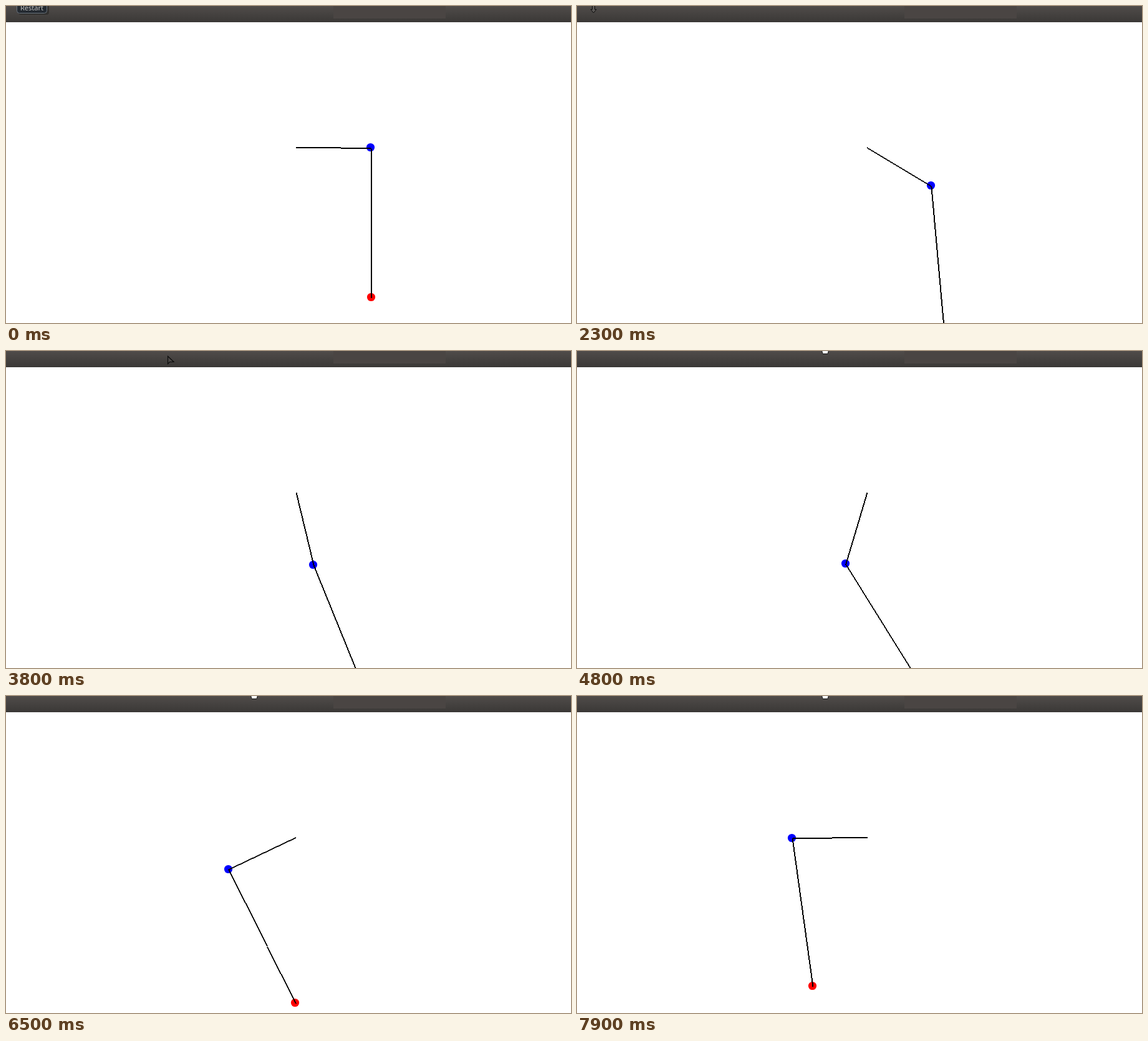
Animation, 906 px wide and 508 px high, one loop 8 s. Source, as an HTML page with a canvas:

```html
<!DOCTYPE html>
<html lang="en">
<head>
<meta charset="utf-8">
<title>Double pendulum</title>
<style>
  html, body { margin: 0; width: 906px; height: 508px; overflow: hidden; background: #fff; }
  canvas, svg { position: absolute; left: 0; top: 0; display: block; }
  text { font: 11px "Noto Sans", "Open Sans", sans-serif; fill: #c3c2c0; }
</style>
</head>
<body>
<canvas id="stage" width="906" height="508"></canvas>
<svg width="906" height="26" viewBox="0 0 906 26">
  <linearGradient id="bar" x1="0" y1="0" x2="0" y2="1">
    <stop offset="0" stop-color="#504c4a"/>
    <stop offset="1" stop-color="#3a3836"/>
  </linearGradient>
  <rect width="906" height="26" fill="url(#bar)"/>
  <rect x="525" width="180" height="20" fill="#4a4543"/>
  <g id="tip">
    <rect x="20" y="-8" width="49" height="22" rx="4" fill="#242322" opacity=".6"/>
    <rect x="17.5" y="-10" width="48" height="21.5" rx="4" fill="#242a31" stroke="#69737d"/>
    <text x="23" y="7">Restart</text>
  </g>
  <path id="down" d="M24.5 -1V5.5H22L26.5 11L31 5.5H28.5V-1" fill="#5a5755" stroke="#0c0c0c"/>
  <path id="arrow" d="M.5 .5V12.5L3.5 9.5H10Z" fill="#4b4846" stroke="#0c0c0c" stroke-width="1.2"/>
  <path id="hand" d="M392.5 -1L394 4.5H402L403.5 -1" fill="#fff" stroke="#111"/>
</svg>
<script>
const $ = id => document.getElementById(id);
const ctx = $("stage").getContext("2d");
const pivot = [465.5, 227];

// seconds, upper angle, its speed, lower angle, its speed (degrees)
const keys = [
  [0, 89.6, -2.3, 0.2, 0],
  [1.2, 78.5, -13.5, 1.1, 1.3],
  [2.3, 59, -23, 5.1, 7],
  [3.8, 13.6, -31.5, 22.1, 13],
  [4.9, -19.6, -29.6, 32.4, 3.5],
  [5.7, -43.3, -30, 32.3, -4],
  [6.2, -57.7, -25, 29.3, -8],
  [7.2, -78.4, -18.3, 18.9, -13.5],
  [7.9, -89.5, -13.5, 7.9, -17.5]
];

// Cubic Hermite value of the angle stored in column c, in radians
function angle(t, c) {
  let i = 0;
  while (i < keys.length - 2 && t >= keys[i + 1][0]) i++;
  const a = keys[i], b = keys[i + 1], h = b[0] - a[0], s = (t - a[0]) / h, r = 1 - s;
  const deg = r * r * ((1 + 2 * s) * a[c] + s * h * a[c + 1])
            + s * s * ((1 + 2 * r) * b[c] - r * h * b[c + 1]);
  return deg * Math.PI / 180;
}

const swing = ([x, y], len, a) => [x + len * Math.sin(a), y + len * Math.cos(a)];

// Hard-edged line, two pixels thick across its minor axis
function rod([x0, y0], [x1, y1]) {
  const dx = x1 - x0, dy = y1 - y0, flat = Math.abs(dx) > Math.abs(dy);
  const n = Math.round(Math.max(Math.abs(dx), Math.abs(dy)));
  ctx.fillStyle = "#000";
  for (let i = 0; i < n; i++) {
    const x = x0 + dx * (i + .5) / n, y = y0 + dy * (i + .5) / n;
    if (flat) ctx.fillRect(Math.floor(x), Math.round(y) - 1, 1, 2);
    else ctx.fillRect(Math.round(x) - 1, Math.floor(y), 2, 1);
  }
}

function bob([x, y], color) {
  ctx.fillStyle = color;
  ctx.beginPath();
  ctx.arc(Math.floor(x) - .5, Math.floor(y) - .5, 6.6, 0, 7);
  ctx.fill();
}

const show = (id, on) => $(id).style.display = on ? "" : "none";

function draw(now) {
  let step = Math.floor(now % 8000 / 100);
  if ([1, 22, 40, 63].includes(step)) step--;   // pictures held twice as long
  const t = step / 10;
  const elbow = swing(pivot, 120, angle(t, 1));
  const end = swing(elbow, 240, angle(t, 3));

  ctx.clearRect(0, 0, 906, 508);
  bob(elbow, "#00f");
  bob(end, "#f00");
  rod(pivot, elbow);
  rod(elbow, end);

  show("tip", step < 15);
  show("down", step >= 15 && step < 35);
  show("arrow", step >= 35 && step < 41);
  show("hand", step >= 41);
  $("arrow").setAttribute("transform", `translate(${259 + 70 * (step - 38)} 8)`);
}

const start = performance.now();
(function loop() {
  draw(performance.now() - start);
  requestAnimationFrame(loop);
})();
</script>
</body>
</html>
```
